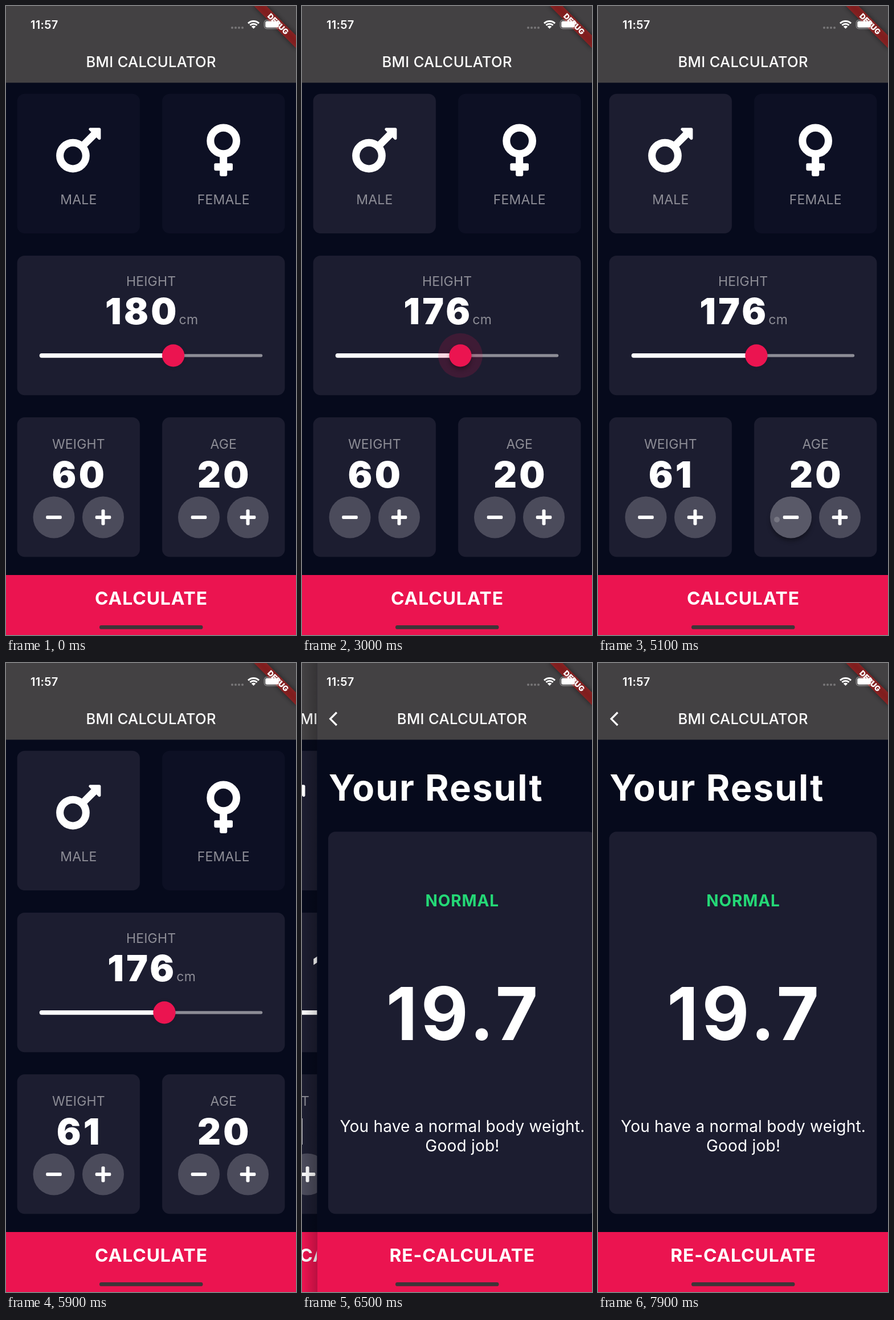
An HTML page for the animation above (8 s loop, 509x1101 px).

```html
<!DOCTYPE html>
<html lang="en">
<head>
<meta charset="utf-8">
<title>BMI calculator</title>
<style>
  html, body { margin: 0; width: 100%; height: 100%; overflow: hidden; background: #060a1c; }
  svg { display: block; width: 100vw; height: 100vh; }
  text { font-family: Inter, Roboto, sans-serif; font-optical-sizing: none; fill: #fff; white-space: pre; }
</style>
</head>
<body>
<svg id="stage" viewBox="0 0 509 1101">
  <defs>
    <filter id="blur" x="-50%" y="-50%" width="200%" height="200%"><feGaussianBlur stdDeviation="4.5"/></filter>
    <linearGradient id="edge"><stop offset="0" stop-opacity="0"/><stop offset="1" stop-opacity=".2"/></linearGradient>
    <clipPath id="disc"><circle r="36.5"/></clipPath>
  </defs>
  <g id="scene"></g>
</svg>
<script>
const LOOP = 8000, STEP = 100, W = 509, MID = W / 2, LEFT = 127.3, RIGHT = 381.7;
const BG = '#060a1c', ACTIVE = '#1c1d30', IDLE = '#0d1024', PINK = '#eb1450', GREY = '#8d8d96';
const DIGIT_GAP = 4.2;
const PRESSES = [
  { at: 4200, x: 170.5, dx: 5, length: 300 },
  { at: 5100, x: 338.5, dx: -24.5, length: 300 },
  { at: 5700, x: 424.5, dx: 4, length: 200 },
];
const clamp = v => Math.max(0, Math.min(1, v));

const rect = (x, y, w, h, fill, r = 0, extra = '') =>
  `<rect x="${x}" y="${y}" width="${w}" height="${h}" rx="${r}" fill="${fill}" ${extra}/>`;
const circle = (x, y, r, fill, extra = '') =>
  `<circle cx="${x}" cy="${y}" r="${r}" fill="${fill}" ${extra}/>`;
const group = (x, y, body, more = '') => `<g transform="translate(${x} ${y}) ${more}">${body}</g>`;

function text(str, x, y, size, weight = 400, gap = 0, fill = '#fff', anchor = 'middle') {
  const shift = anchor === 'middle' ? gap / 2 : 0;
  return `<text x="${x + shift}" y="${y}" text-anchor="${anchor}" ` +
    `style="font-size:${size}px;font-weight:${weight};letter-spacing:${gap}px;fill:${fill}">${str}</text>`;
}
const label = (str, x, y) => text(str, x, y, 23, 400, .2, GREY);
const number = (str, x) => text(str, x - .6, 843, 63.5, 900, DIGIT_GAP);
const card = (x, y, w, h, fill = ACTIVE) => rect(x, y, w, h, fill, 13);

function frame(button) {
  return rect(0, 0, W, 1101, BG) + rect(0, 0, W, 134.3, '#434143') +
    text('BMI CALCULATOR', MID, 107.3, 25.5, 500, .35) +
    rect(0, 996, W, 105, PINK) + text(button, MID, 1047.5, 31.8, 700, .9);
}

// Gender signs share a 512-unit em
const sign = (x, ringY, body) => group(x, 200.1,
  `<circle cx="144" cy="${ringY}" r="112" fill="none" stroke="#fff" stroke-width="64"/>${body}`, 'scale(.2039)');
const male = sign(88.1, 304,
  '<path fill="#fff" d="M372 64h-79c-11 0-16 13-8.500 20.500l17 17-90 90 45 45 90-90 17 17c7.500 7.500 20.500 2 20.500-8.500V76c0-7-5-12-12-12z"/>');
const female = sign(352.3, 176, rect(112, 300, 64, 180, '#fff', 12) + rect(64, 368, 160, 64, '#fff', 12));

function roundButton(x, plus, t) {
  const press = PRESSES.find(p => p.x === x && t >= p.at && t < p.at + p.length);
  let body = '';
  if (press) body += circle(0, 6, 35, '#000', 'opacity=".4" filter="url(#blur)"');
  body += circle(0, 0, 36.5, '#4b4b5b');
  if (press) {
    const age = t - press.at, fade = 1 - age / 350;
    body += circle(0, 0, 36.5, '#fff', `opacity="${.08 * fade}"`) +
      `<g clip-path="url(#disc)">${circle(press.dx, 4, 5 + age * .2, '#fff', `opacity="${.18 * fade}"`)}</g>`;
  }
  body += rect(-13.8, -3, 27.6, 6, '#fff', 2);
  if (plus) body += rect(-3, -13.8, 6, 27.6, '#fff', 2);
  return group(x, 895, body);
}

function slider(t) {
  const value = Math.round(180 - 4 * clamp((t - 2600) / 400));
  const halo = t < 3300 ? clamp((t - 2550) / 100) : clamp(1 - (t - 3250) / 200);
  const x = 58.7 + (value - 120) * 3.915, y = 611.8;
  return `<text x="${MID + 1.3}" y="557" text-anchor="middle">` +
    `<tspan style="font-size:63.5px;font-weight:900;letter-spacing:${DIGIT_GAP}px">${value}</tspan>` +
    `<tspan style="font-size:23px;letter-spacing:.4px;fill:${GREY}">cm</tspan></text>` +
    rect(x, y - 2.6, 450.2 - x, 5.2, GREY, 2.6) + rect(58.7, y - 3.9, x - 58.7, 7.8, '#fff', 3.9) +
    circle(x, y, 39 * halo, PINK, 'opacity=".16"') +
    circle(x, y + 1 + 4 * halo, 18.5, '#000', `opacity="${.12 + .28 * halo}" filter="url(#blur)"`) +
    circle(x, y, 19.6, PINK);
}

function inputPage(t) {
  const age = t >= 5200 && t < 5800 ? 19 : 20;
  return frame('CALCULATE') +
    card(19.6, 153.7, 215.3, 244.3, t >= 1600 ? ACTIVE : IDLE) + card(274.1, 153.7, 215.3, 244.3, IDLE) +
    male + female + label('MALE', LEFT, 347) + label('FEMALE', RIGHT, 347) +
    card(19.6, 436.9, 469.8, 244.3) + label('HEIGHT', MID, 489.5) + slider(t) +
    card(19.6, 720.1, 215.3, 244.1) + label('WEIGHT', LEFT, 775.3) + number(t >= 4300 ? 61 : 60, LEFT) +
    card(274.1, 720.1, 215.3, 244.1) + label('AGE', RIGHT, 775.3) + number(age, RIGHT) +
    [84, 170.5, 338.5, 424.5].map((x, i) => roundButton(x, i % 2, t)).join('');
}

const resultPage = rect(-25, 0, 25, 1101, 'url(#edge)') + frame('RE-CALCULATE') +
  '<path d="M34.500 86.500L23.300 97.800l11.200 11.200" fill="none" stroke="#fff" stroke-width="3.300"/>' +
  text('Your Result', 20.3, 241, 63.5, 700, 2.1, '#fff', 'start') +
  card(19.6, 295.3, 469.8, 668.9) +
  text('NORMAL', MID, 426, 28, 700, .9, '#24d876') +
  text('19.7', MID, 660, 128.5, 700, 5.8) +
  text('You have a normal body weight.', MID + .5, 820.5, 28, 400, .22) +
  text('Good job!', MID + .5, 854.5, 28, 400, .22);

const arc = r => {
  const d = r * .707;
  return `<path d="M${434.5 - d} ${39.8 - d}A${r} ${r} 0 0 1 ${434.5 + d} ${39.8 - d}" fill="none" stroke="#fff" stroke-width="3"/>`;
};
const overlay =
  group(W, 0,
    rect(-52.2, 36.5, 104.4, 15.7, '#000', 0, 'opacity=".5" filter="url(#blur)"') +
    rect(-52.2, 36.5, 104.4, 15.7, '#b71c1c', 0, 'opacity=".63"') +
    text('DEBUG', 0, 49.1, 13.2, 900), 'rotate(45)') +
  text('11:57', 43, 39.8, 20, 600, .3, '#fff', 'start') +
  [397, 403, 409, 415].map(x => circle(x, 38, 2.1, '#777577')).join('') +
  arc(13.4) + arc(8.6) + '<path d="M434.500 39.800l-3.800-3.800a5.400 5.400 0 0 1 7.600 0z" fill="#fff"/>' +
  rect(453.3, 24.6, 27.4, 15, 'none', 4.5, 'stroke="#fff" stroke-opacity=".45" stroke-width="1.2"') +
  rect(455.2, 26.4, 23.6, 11.4, '#fff', 2.8) + rect(482.2, 29.5, 1.8, 5, '#fff', .9, 'opacity=".5"') +
  rect(164, 1084, 181.5, 6.8, '#3d3538', 3.4);

function draw(t) {
  let pages;
  if (t < 6400) pages = inputPage(t);
  else if (t >= 6700) pages = resultPage;
  else {
    const left = Math.exp((6309 - t) / 64.5);
    pages = group(-(1 - left) * W / 3, 0, inputPage(t)) + group(left * W, 0, resultPage);
  }
  scene.innerHTML = pages + overlay;
}

const scene = document.getElementById('scene');
const start = performance.now();
let shown = -1;
function tick() {
  const t = Math.floor((performance.now() - start) % LOOP / STEP) * STEP;
  if (t !== shown) draw(shown = t);
  requestAnimationFrame(tick);
}
tick();
</script>
</body>
</html>
```
